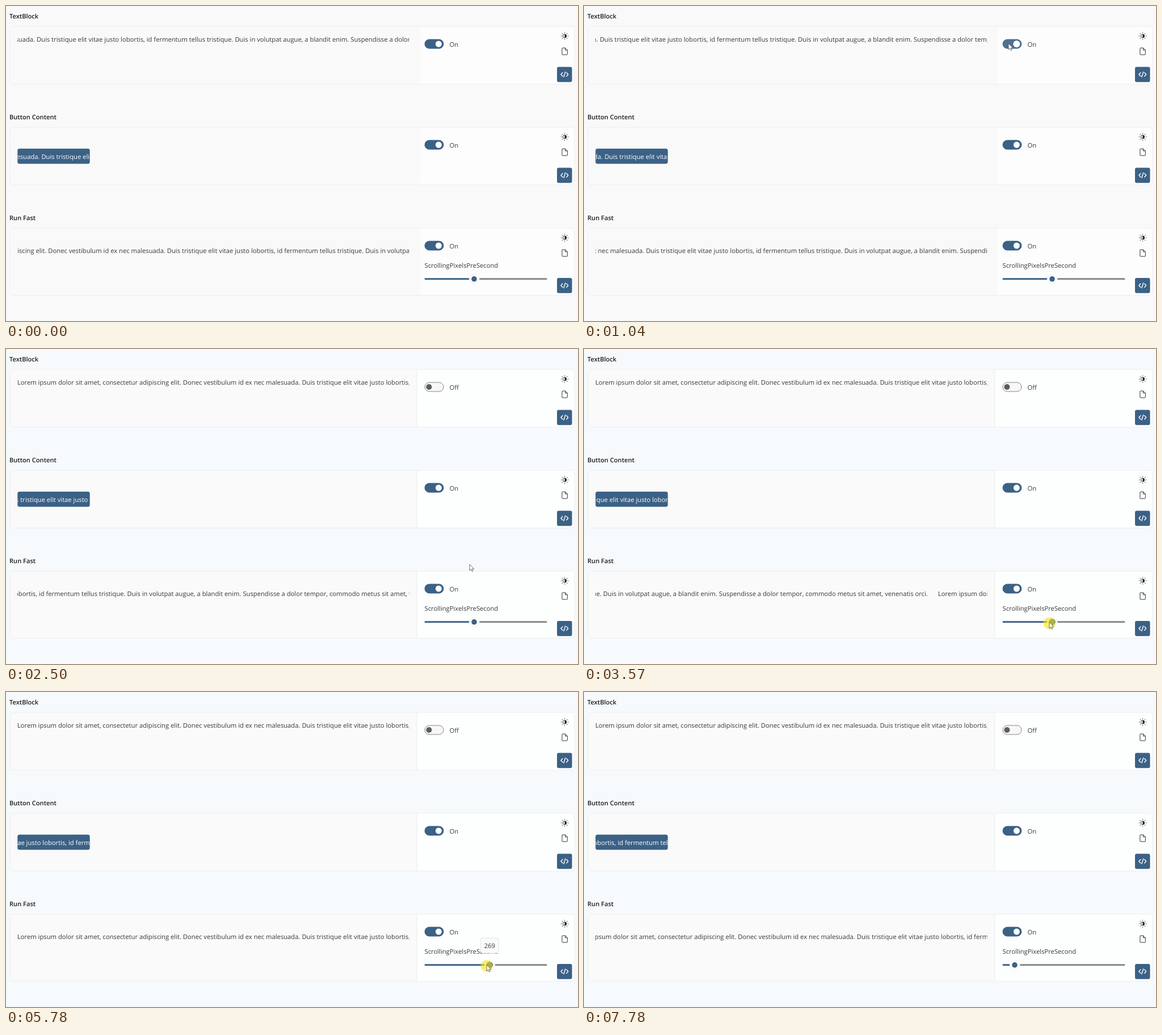
Animation, 1008 px wide and 556 px high, one loop 7850 ms. Source, as an HTML page:

```html
<!DOCTYPE html>
<html lang="en">
<head>
<meta charset="utf-8">
<title>Scrolling text</title>
<style>
  html, body { margin: 0; width: 100%; height: 100%; overflow: hidden; background: #f9f9f9; }
  svg { display: block; width: 100vw; height: 100vh; }
  text { font: 11.22px "Open Sans", "Noto Sans", sans-serif; fill: #3a3a3a;
         text-rendering: geometricPrecision; white-space: pre; }
  .title { font-size: 11.1px; font-weight: 600; fill: #1d1d1d; }
  .light { fill: #fff; }
  .accent { fill: #3b6186; }
  .line { fill: none; stroke: #333; stroke-width: 1; }
</style>
</head>
<body>
<svg id="stage" viewBox="0 0 1008 556" preserveAspectRatio="none"></svg>
<script>
const LOOP = 7850;
const CLICK = 1250;          // first switch turns off
const PERIOD = 1440.8;       // text width plus gap
const SCALE = 0.845;         // stage pixels per layout pixel
const HOME = 20;
const TEXT = "Lorem ipsum dolor sit amet, consectetur adipiscing elit. Donec vestibulum id ex nec malesuada. " +
  "Duis tristique elit vitae justo lobortis, id fermentum tellus tristique. Duis in volutpat augue, " +
  "a blandit enim. Suspendisse a dolor tempor, commodo metus sit amet, venenatis orci.";

const stage = document.getElementById("stage");

function set(node, attrs) {
  for (const key in attrs) node.setAttribute(key, attrs[key]);
  return node;
}

function add(parent, tag, attrs, content) {
  const node = set(document.createElementNS("http://www.w3.org/2000/svg", tag), attrs);
  if (content !== undefined) node.textContent = content;
  parent.appendChild(node);
  return node;
}

const clamp01 = v => Math.max(0, Math.min(1, v));
const ease = v => (1 - Math.cos(Math.PI * clamp01(v))) / 2;
const mix = (a, b, k) => a + (b - a) * k;
const show = (node, on) => set(node, { visibility: on ? "visible" : "hidden" });

const defs = add(stage, "defs", {});
function clip(id, x, y, width, height) {
  add(add(defs, "clipPath", { id }), "rect", { x, y, width, height, rx: 3 });
}

const back = add(stage, "rect", { width: 1008, height: 556 });

function marquee(id, baseline, box, cls) {
  clip(id, ...box);
  const holder = add(stage, "g", { "clip-path": `url(#${id})` });
  const strip = add(holder, "g", {});
  for (const x of [0, PERIOD]) add(strip, "text", { x, y: baseline, class: cls }, TEXT);
  return x => set(strip, { transform: `translate(${x.toFixed(2)} 0)` });
}

function icons(top, bottom) {
  const sun = add(stage, "g", { transform: `translate(984.5 ${top + 17})` });
  add(sun, "circle", { r: 3.2, class: "line" });
  add(sun, "path", { d: "M0-3.2A3.2 3.2 0 0 1 0 3.2Z", fill: "#222" });
  for (let i = 0; i < 8; i++) {
    const a = i * Math.PI / 4;
    add(sun, "circle", { cx: 6 * Math.cos(a), cy: 6 * Math.sin(a), r: 0.7, fill: "#333" });
  }
  add(stage, "path", {
    class: "line", transform: `translate(984.5 ${top + 44})`, "stroke-linejoin": "round",
    d: "M-3.6-6H1L4.8-2.2V5Q4.8 6 3.8 6H-3.6Q-4.6 6-4.6 5V-5Q-4.6-6-3.6-6ZM1-6V-2.2H4.8"
  });
  add(stage, "rect", { x: 971, y: bottom - 30.5, width: 26.5, height: 26.8, rx: 3, class: "accent" });
  add(stage, "path", {
    transform: `translate(984.3 ${bottom - 17.2})`, fill: "none", stroke: "#fff",
    "stroke-width": 1.4, "stroke-linecap": "round", "stroke-linejoin": "round",
    d: "M-3.4-3.2L-6.4 0L-3.4 3.2M3.4-3.2L6.4 0L3.4 3.2M1.4-4.5L-1.4 4.5"
  });
}

function toggle(y) {
  const pill = add(stage, "rect", { x: 738, y: y - 8, width: 33, height: 16, rx: 8 });
  const knob = add(stage, "circle", { cy: y });
  const label = add(stage, "text", { x: 781.4, y: y + 4.8 });
  return (on, slide, hover) => {
    set(pill, {
      fill: on ? (hover ? "#4e7192" : "#3b6186") : "#f7f7f7",
      stroke: on ? (hover ? "#4e7192" : "#3b6186") : "#868686"
    });
    set(knob, { cx: mix(745.4, 762.4, slide), r: hover ? 6 : on ? 5.5 : 5, fill: on ? "#fff" : "#5c5c5c" });
    label.textContent = on ? "On" : "Off";
  };
}

function card(title, top, bottom) {
  add(stage, "text", { x: 6, y: top - 14, class: "title" }, title);
  const shape = { x: 6.5, y: top, width: 995.5, height: bottom - top, rx: 6 };
  const base = add(stage, "rect", shape);
  const side = add(stage, "path", {});
  const edge = add(stage, "path", { stroke: "#ececec" });
  add(stage, "rect", { ...shape, fill: "none", stroke: "#ededed" });
  icons(top, bottom);
  const flip = toggle(top + 31);
  const paint = off => {
    const x = off ? 724 : 729;
    set(base, { fill: off ? "#f9faf9" : "#f9f9f9" });
    set(side, {
      fill: off ? "#fdfefe" : "#fdfdfd",
      d: `M${x} ${top}H996Q1002 ${top} 1002 ${top + 6}V${bottom - 6}Q1002 ${bottom} 996 ${bottom}H${x}Z`
    });
    set(edge, { d: `M${x} ${top}V${bottom}`, opacity: off ? 1 : 0 });
  };
  return { flip, paint };
}

const cards = [
  card("TextBlock", 36, 138),
  card("Button Content", 214, 316),
  card("Run Fast", 392, 510.5)
];

add(stage, "rect", { x: 20.3, y: 251.8, width: 127.4, height: 26.8, rx: 3.5, class: "accent" });

const moveBlock = marquee("blockClip", 63, [20, 46, 690.5, 26], "");
const moveButton = marquee("buttonClip", 270, [20.8, 252, 126.4, 26], "light");
const moveFast = marquee("fastClip", 436, [20, 418, 690.5, 26], "");

// Slider
add(stage, "text", { x: 737.6, y: 461.5 }, "ScrollingPixelsPreSecond");
const filled = add(stage, "path", { stroke: "#3b6186", "stroke-width": 3, "stroke-linecap": "round" });
const rest = add(stage, "path", { stroke: "#868686", "stroke-width": 3, "stroke-linecap": "round" });
const thumb = add(stage, "g", {});
add(thumb, "circle", { r: 8.6, fill: "#fefefe", stroke: "#ececec", "stroke-width": 0.8 });
const dot = add(thumb, "circle", { class: "accent" });
const tip = add(stage, "g", {});
add(tip, "rect", { x: -16, y: 434, width: 32, height: 27, rx: 3.5, fill: "#fafafa", stroke: "#e2e2e2" });
const tipText = add(tip, "text", { y: 451.6, "text-anchor": "middle" });

const glow = add(stage, "circle", { r: 10.5, fill: "#f5e51b", opacity: 0.62 });
const cursor = add(stage, "path", {
  d: "M0 0V11L2.5 8.7L4.2 12.4L6 11.6L4.3 8H7.8Z",
  fill: "#fff", stroke: "#4a4a4a", "stroke-width": 0.8, "stroke-linejoin": "round"
});

const drags = [
  { press: 3520, start: 3600, end: 4393, from: 825, to: 909 },
  { press: 5250, start: 5350, end: 6373, from: 909, to: 759 }
];
const sliderValue = x => (x - 745.4) / 199 * 500;

function thumbAt(t) {
  let x = 825;
  for (const d of drags) if (t >= d.start) x = mix(d.from, d.to, ease((t - d.start) / (d.end - d.start)));
  return x;
}

// Every change of speed sends the fast line back to its start.
function fastAt(t, x) {
  const last = drags.filter(d => t >= d.start).pop();
  if (!last) return -217.4 - 0.1679 * t;
  return HOME - sliderValue(x) * SCALE * Math.max(0, t - last.end) / 1000;
}

const path = [
  [600, 772, -14], [900, 748, 66], [1700, 748, 66], [2450, 817, 380], [2570, 817, 380], [3200, 820, 482]
];

function cursorAt(t, x) {
  if (t >= 7500) return [x - 5.3, 481 + 90 * ((t - 7500) / 210) ** 2];
  if (t >= 3600) return [x - 5.3, 481.5];
  let i = 0;
  while (i < path.length - 2 && t > path[i + 1][0]) i++;
  const a = path[i], b = path[i + 1];
  const k = ease((t - a[0]) / (b[0] - a[0]));
  return [mix(a[1], b[1], k), mix(a[2], b[2], k)];
}

function draw(t) {
  const off = t >= CLICK;
  const x = thumbAt(t);
  const [cx, cy] = cursorAt(t, x);

  set(back, { fill: off ? "#f7fafd" : "#f9f9f9" });
  cards.forEach((c, i) => {
    c.paint(off);
    if (i) c.flip(true, 1, false);
  });
  cards[0].flip(!off, off ? 1 - ease((t - CLICK) / 150) : 1, t > 850 && t < 1760);

  moveBlock(off ? HOME : -447.4 - 0.0253 * t);
  moveButton(-438.9 - 0.0253 * t);
  moveFast(fastAt(t, x));

  set(filled, { d: `M739 481.8H${x - 10}` });
  set(rest, { d: `M${x + 10.5} 481.8H952` });
  set(thumb, { transform: `translate(${x} 481.8)` });
  set(dot, { r: t > 3150 && t < 7560 ? 5.8 : 4.8 });

  show(tip, drags.some(d => t >= d.start && t < d.end + 100));
  set(tip, { transform: `translate(${x} 0)` });
  tipText.textContent = Math.round(sliderValue(x));

  const held = drags.some(d => t >= d.press && t < d.end + 40) || (t > CLICK - 90 && t < CLICK + 20);
  show(glow, held);
  set(glow, { cx, cy: cy + 2 });
  set(cursor, { transform: `translate(${cx} ${cy})` });
  show(cursor, t > 600 && t < 7710);
}

function tick() {
  draw(performance.now() % LOOP);
  requestAnimationFrame(tick);
}
tick();
</script>
</body>
</html>
```
